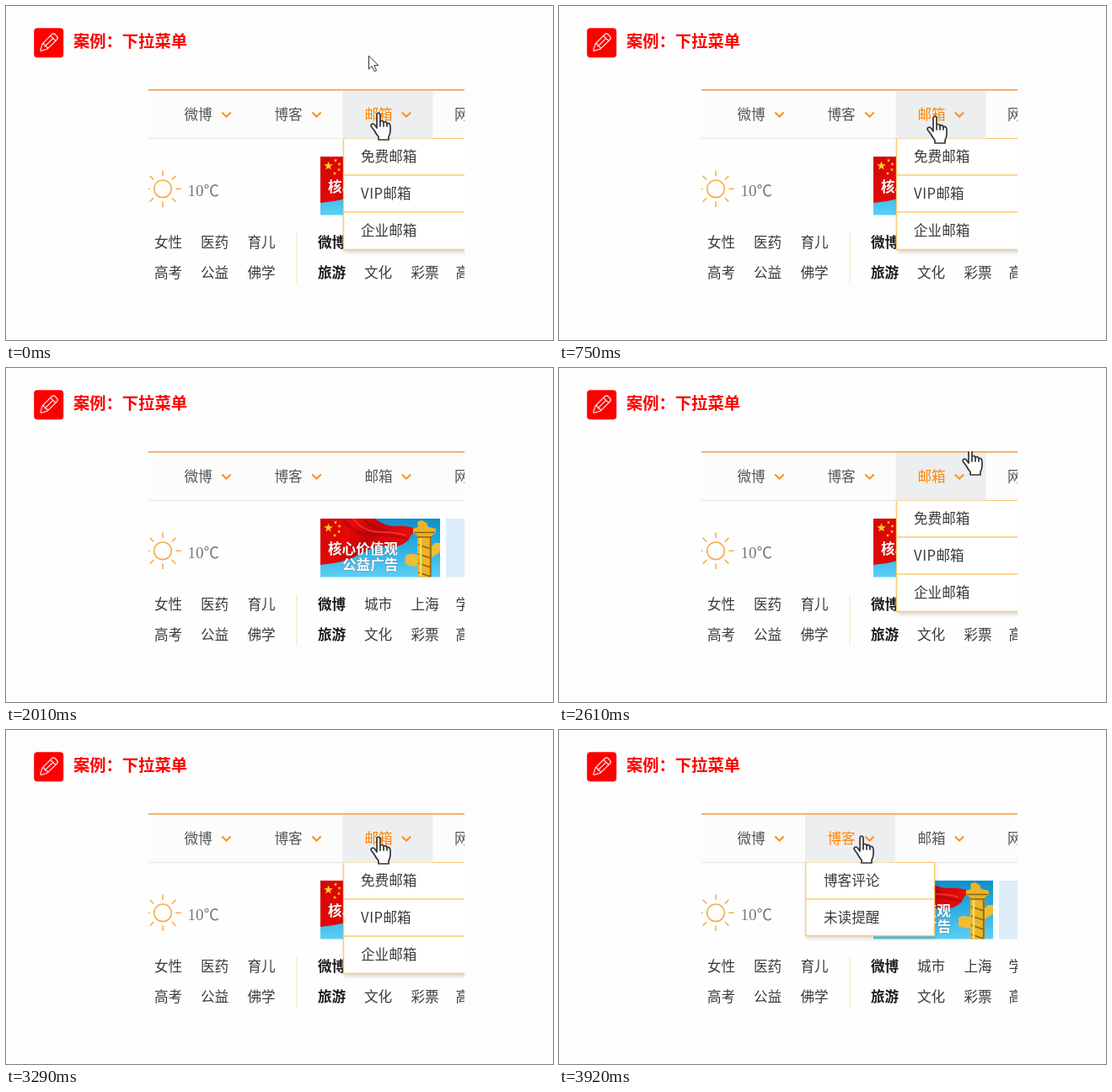
An HTML page that plays this animation: 649x397 px, repeating every 3950 ms.

```html
<!DOCTYPE html>
<html lang="zh-CN">
<head>
<meta charset="utf-8">
<title>下拉菜单</title>
<style>
  html, body { margin: 0; width: 100%; height: 100%; overflow: hidden; background: #fdfdfd; }
  svg { display: block; }
  text { font: 16.6px "Noto Sans CJK SC", "Noto Sans CJK", sans-serif; fill: #3a3a3a; }
  .title { font-size: 19.3px; font-weight: 700; fill: #fe0000; }
  .nav text { fill: #555; }
  .bold { font-weight: 700; fill: #1c1c1c; }
  .latin { letter-spacing: .6px; }
  .slogan text { font-weight: 700; fill: #fff; stroke: #7a3030; stroke-width: 1px; stroke-opacity: .35; paint-order: stroke; }
  .temp { font: 19px "Liberation Serif", serif; fill: #777; }
  .degree { font: 300 18.5px "Noto Sans CJK SC", "Noto Sans CJK", sans-serif; }
  .tab { fill: #edeef0; }
  .menu .label { fill: #ff8400; }
  .panel { fill: #fff; stroke: #f9c76b; filter: drop-shadow(1px 3px 2px rgba(0, 0, 0, .15)); }
  .rule { fill: none; stroke: #fecc6b; stroke-width: 1.4; }
  .chevron { fill: none; stroke: #f9921c; stroke-width: 2; }
  .pointer { fill: #fff; stroke: #34343c; stroke-linejoin: round; stroke-linecap: round; }

  .menu, .hand, .arrow { animation: 3950ms step-end infinite; }
  .menu { opacity: 0; }
  .weibo { animation-name: weibo; }
  .blog { animation-name: blog; }
  .mail { animation-name: mail; }
  .hand { animation-name: hand; }
  .arrow { animation-name: arrow; }

  @keyframes weibo {
    0%, 11.392%, 100% { opacity: 0; }
    9.367% { opacity: 1; }
  }
  @keyframes blog {
    0%, 16.962% { opacity: 0; }
    11.392%, 86.582%, 100% { opacity: 1; }
  }
  @keyframes mail {
    0%, 16.962%, 66.075% { opacity: 1; }
    9.367%, 35.696%, 86.582%, 100% { opacity: 0; }
  }
  @keyframes hand {
    0% { transform: translate(432px, 126px); }
    9.367% { transform: translate(240px, 127px); }
    11.392% { transform: translate(342px, 128px); }
    16.962% { transform: translate(420px, 130px); }
    18.987% { transform: translate(436px, 130px); }
    31.392% { transform: translate(444px, 117px); }
    33.67% { transform: translate(452px, 88px); }
    35.696% { transform: translate(460px, -60px); }
    66.075% { transform: translate(478px, 94px); }
    68.101% { transform: translate(480px, 129px); }
    71.645% { transform: translate(446px, 125px); }
    83.291% { transform: translate(432px, 126px); }
    86.582% { transform: translate(376px, 126px); }
    89.62% { transform: translate(351px, 126px); }
    99.24%, 100% { transform: translate(349px, 125px); }
  }
  @keyframes arrow {
    0% { transform: translate(430px, 59px); }
    1.012% { transform: translate(424px, 34px); }
    2.025% { transform: translate(413px, 1px); }
    3.037%, 100% { transform: translate(405px, -40px); }
  }
</style>
</head>
<body>
<svg width="649" height="397" viewBox="0 0 649 397">
  <defs>
    <clipPath id="page"><rect x="169" y="99" width="375" height="231"/></clipPath>
    <clipPath id="ad"><rect x="373" y="179" width="142" height="69.5"/></clipPath>
    <linearGradient id="sky" x2="0" y2="1">
      <stop stop-color="#0d8fca"/><stop offset=".5" stop-color="#2fb0e2"/><stop offset="1" stop-color="#5ccff5"/>
    </linearGradient>
    <linearGradient id="flag" x2="1" y2=".3">
      <stop stop-color="#cf0606"/><stop offset=".35" stop-color="#e60808"/>
      <stop offset=".55" stop-color="#c40508"/><stop offset="1" stop-color="#f00c0c"/>
    </linearGradient>
    <path id="chevron" class="chevron" d="M256.3 126.5l5.2 5 5.2-5"/>
    <path id="star" d="M0-1L.24-.32.95-.31.38.12.59.81 0 .4-.59.81-.38.12-.95-.31-.24-.32Z" fill="#ffd51e"/>
    <path id="ray" d="M186 202v-6.5"/>
  </defs>

  <rect x="33.2" y="26.2" width="35" height="35" rx="4" fill="#fe0000"/>
  <g transform="translate(50.5 43.7) rotate(45)" fill="none" stroke="#fff" stroke-width="1.1" stroke-linejoin="round">
    <path d="M-4.300 6V-9.500q0-3 3-3h2.600q3 0 3 3V6L.8 12.800q-.8 1-1.600 0ZM-4.300-7.500h8.600M-4.300 6q2.150-2.500 4.300 0 2.150-2.500 4.300 0M0-7.500V5"/>
  </g>
  <text class="title" x="80" y="48.5">案例：下拉菜单</text>

  <g clip-path="url(#page)">
    <path d="M169 99h375v231H169Z" fill="#fefefe"/>
    <path d="M169 101h375v56H169Z" fill="#fcfcfc"/>
    <path d="M169 157.5h375" stroke="#e9ebed" stroke-width="1.4"/>
    <path d="M169 99.700h375" stroke="#f59a35" stroke-width="1.400"/>
    <g class="nav">
      <text x="211.5" y="135.2">微博</text>
      <text x="318.5" y="135.2">博客</text>
      <text x="425.5" y="135.2">邮箱</text>
      <text x="532" y="135.2">网</text>
      <use href="#chevron"/>
      <use href="#chevron" x="107"/>
      <use href="#chevron" x="213.5"/>
    </g>

    <g fill="none" stroke="#f7ad4a" stroke-width="1.6">
      <circle cx="186" cy="217.3" r="10.3"/>
      <use href="#ray"/>
      <use href="#ray" transform="rotate(45 186 217.3)"/>
      <use href="#ray" transform="rotate(90 186 217.3)"/>
      <use href="#ray" transform="rotate(135 186 217.3)"/>
      <use href="#ray" transform="rotate(180 186 217.3)"/>
      <use href="#ray" transform="rotate(225 186 217.3)"/>
      <use href="#ray" transform="rotate(270 186 217.3)"/>
      <use href="#ray" transform="rotate(315 186 217.3)"/>
    </g>
    <text class="temp" x="215.5" y="225.7">10<tspan class="degree" x="234.5">℃</tspan></text>

    <g clip-path="url(#ad)">
      <path d="M373 179h142v70H373Z" fill="url(#sky)"/>
      <path d="M373 179h64q14 10 28 9 12-1 22 4-6 5-10 13-9 9-24 7-16-1-32 9-20 11-48 13Z" fill="url(#flag)"/>
      <path d="M400 179q12 20 34 19t44 6M424 179q10 13 30 14" fill="none" stroke="#9c0508" stroke-width="3" opacity=".45"/>
      <path d="M412 179q12 16 32 16t30 4" fill="none" stroke="#ff4a3c" stroke-width="2" opacity=".6"/>
      <use href="#star" transform="translate(382.5 190) scale(5.5)"/>
      <use href="#star" transform="translate(391 183.5) scale(2.2)"/>
      <use href="#star" transform="translate(395.5 188) scale(2.2)"/>
      <use href="#star" transform="translate(395 194.5) scale(2.2)"/>
      <use href="#star" transform="translate(390 199) scale(2.2)"/>
      <path d="M502 215l7-7h6v11l-13 8ZM474 223q7-4 15 0v12q-8 2-15-2Z" fill="#eebd35"/>
      <path d="M489 189l-1-6 5-2 6 3 2 5 9 2v5l-5 3v50h-17v-50l-5-3v-5Z" fill="#e9b428"/>
      <path d="M484 195.500h25M488 201h17M489 210l15 5M489 221l15 5M489 232l15 5M489 243l15 5" fill="none" stroke="#8f6110" stroke-width="1.400"/>
      <path d="M492 202v46" stroke="#fbdc5c" stroke-width="2.500"/>
      <path d="M503.800 200v48" stroke="#9a6a12" stroke-width="2"/>
      <g class="slogan">
        <text x="382" y="221.2">核心价值观</text>
        <text x="399" y="240.2">公益广告</text>
      </g>
    </g>
    <path d="M522 179h22v69.5h-22Z" fill="#dcecf8"/>

    <path d="M345 269v61" stroke="#fae8c6" stroke-width="1.3"/>
    <text y="287.2"><tspan x="176">女性</tspan><tspan x="231">医药</tspan><tspan x="286.5">育儿</tspan><tspan x="370" class="bold">微博</tspan><tspan x="425">城市</tspan><tspan x="480.5">上海</tspan><tspan x="533.5">学</tspan></text>
    <text y="323.2"><tspan x="176">高考</tspan><tspan x="231">公益</tspan><tspan x="286.5">佛学</tspan><tspan x="370" class="bold">旅游</tspan><tspan x="425">文化</tspan><tspan x="480.5">彩票</tspan><tspan x="533.5">高</tspan></text>

    <g class="menu weibo">
      <path class="panel" d="M185.5 157.5h107v132h-107Z"/>
      <path class="tab" d="M185 101h107v56.5H185Z"/>
      <text class="label" x="211.5" y="135.2">微博</text>
      <use href="#chevron"/>
      <path class="rule" d="M185.5 158v131.5h107M185.5 201h107M185.5 245h107"/>
      <text x="207" y="185.2">私信</text>
      <text x="207" y="229.2">评论</text>
      <text x="207" y="273.2">@我</text>
    </g>
    <g class="menu blog">
      <path class="panel" d="M292.5 157.5h153v87h-153Z"/>
      <path class="tab" d="M292 101h107v56.5H292Z"/>
      <text class="label" x="318.5" y="135.2">博客</text>
      <use href="#chevron" x="107"/>
      <path class="rule" d="M292.7 158v86.5h152.8V158M292.5 201h153"/>
      <text x="314" y="185.2">博客评论</text>
      <text x="314" y="229.2">未读提醒</text>
    </g>
    <g class="menu mail">
      <path class="panel" d="M400.5 157.5h153v132h-153Z"/>
      <path class="tab" d="M399.5 101h107v56.5h-107Z"/>
      <text class="label" x="425.5" y="135.2">邮箱</text>
      <use href="#chevron" x="213.5"/>
      <path class="rule" d="M400.5 158v131.5h153M400.5 201h153M400.5 245h153"/>
      <text x="421" y="185.2">免费邮箱</text>
      <text x="421" y="229.2"><tspan class="latin">VIP</tspan><tspan x="447.5">邮箱</tspan></text>
      <text x="421" y="273.2">企业邮箱</text>
    </g>

    <g class="hand">
      <path class="pointer" stroke-width="1.7" d="M8 19V4Q8 1 10 1t2 3v8.5Q12 10.5 14 10.5t2 2.5Q16.3 11.5 18 11.7t2 2.6Q20.5 13 22 13.4t2 3V22q0 4-2 7.5v3.5H10v-3.5Q7 26 5 22L1.6 17.5Q.5 15.5 2 14.5 4 13.5 6 16ZM12 12v5M16 13v4M20 14v3"/>
    </g>
  </g>

  <g class="arrow">
    <path class="pointer" d="M.5.5v15.5l3.7-3.5 2.9 6.3 2.5-1.1-2.8-6.1h4.7Z"/>
  </g>
</svg>
</body>
</html>
```
